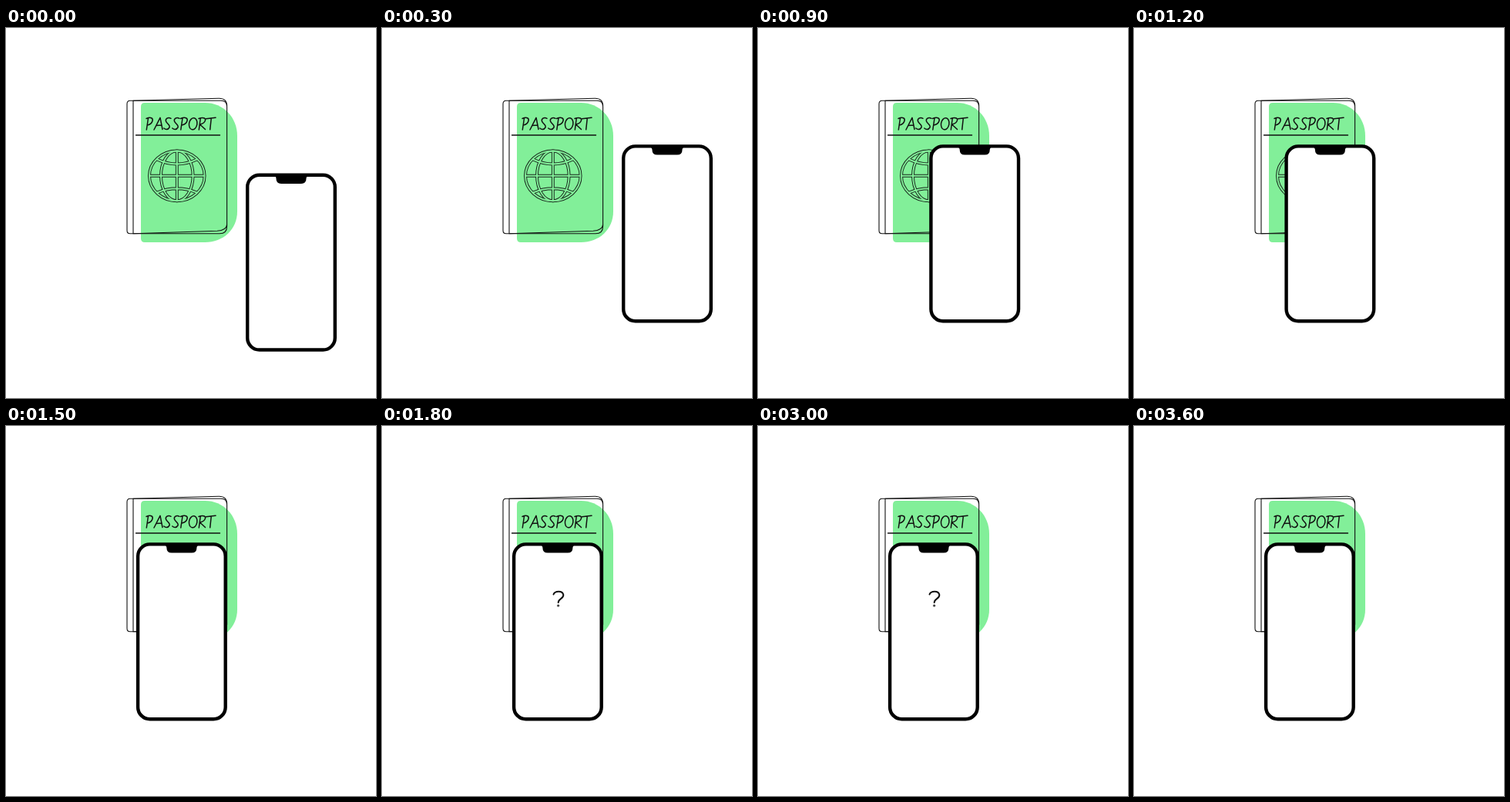
Animation, 480 px wide and 480 px high, one loop 4200 ms. Source, as an HTML page:

```html
<!DOCTYPE html>
<html lang="en">
<head>
<meta charset="utf-8">
<title>Passport and phone</title>
<style>
  html, body { margin: 0; width: 100%; height: 100%; overflow: hidden; background: #fff; }
  svg { display: block; width: 100vw; height: 100vh; }
  .line { fill: none; stroke: #111; stroke-width: 1.1; stroke-linecap: round; stroke-linejoin: round; }
</style>
</head>
<body>
<svg viewBox="0 0 480 480">
  <defs>
    <g id="globe" fill="none">
      <ellipse cx="221.8" cy="191.8" rx="35.8" ry="32.4"/>
      <ellipse cx="221.8" cy="191.8" rx="20.8" ry="32.4"/>
      <path d="M221.8 159.4V224.2M186 191.8H257.6M196 170.5Q221.8 182.5 247.6 170.5M196 213.5Q221.8 203 247.6 213.5"/>
    </g>
  </defs>

  <path fill="#82ef99" d="M180 97H258C282 97 300 116 300 140V238C300 261 282 278 258 278H180Q175 278 175 273V102Q175 97 180 97Z"/>

  <g class="line">
    <path d="M279 94.3H161Q157 94.3 157 98.5V262.5Q157 266.8 161 266.8H277Q286.6 266.8 286.6 257.5V102Q286.6 94.3 279 94.3M165 94.3V266.8"/>
    <path d="M165 94.3L276 91.2Q286.6 91 286.6 101M165 266.8L274 263.2Q286 262.5 286.6 255"/>
    <path stroke-width="1.4" d="M168.5 139H277.5"/>
  </g>

  <g class="line" style="stroke-width:1.5" role="img" aria-label="PASSPORT">
    <path d="M184.5 117L182.3 132M182 117.5C188 115 191 117 190 120.5C189 124 186 125.5 183.5 126"/>
    <path d="M192 132L200 116.3L203 131.5M195 126.6L202 126"/>
    <path id="s" d="M214 117.3C210 115 206.5 118 207.5 121C208.5 124 213.5 126 212 129C210 132.3 207 132 204.8 130"/>
    <use href="#s" x="11"/>
    <path d="M229 117L226.8 132M226.5 117.5C233 115 236 117 235 120.5C234 124 231 125.5 228 126"/>
    <ellipse cx="242.7" cy="124.3" rx="5.2" ry="7.6" transform="rotate(10 242.7 124.3)"/>
    <path d="M252.3 117L250.3 132M250 117.5C257 115 260 117.5 258 121C257 123.2 254.5 124.5 251.5 125L258.5 131.5"/>
    <path d="M259.5 117.8L272 116.3M266.3 117L264.7 131.8"/>
  </g>

  <use href="#globe" stroke="#17251b" stroke-width="3.9"/>
  <use href="#globe" stroke="#82ef99" stroke-width="2"/>

  <g id="phone">
    <rect x="2.2" y="2.2" width="113.6" height="226.8" rx="15.5" fill="#fff" stroke="#000" stroke-width="4.4"/>
    <path d="M36.5 3Q39.5 4 39.5 7Q39.5 13.4 46 13.4H72Q78.5 13.4 78.5 7Q78.5 4 81.5 3Z"/>
  </g>

  <g id="mark" class="line" style="stroke-width:2" visibility="hidden">
    <path d="M222.5 218.5C224 213.5 234.5 213 235.3 219C235.8 224 229 223.5 228.7 229"/>
    <circle cx="228.6" cy="233" r=".5"/>
  </g>
</svg>
<script>
const LOOP = 4200, STEP = 300;
const stops = [[311, 188.5], [311, 151.2], [284.3, 151.2], [222.2, 151.2], [195.4, 151.2], [168.9, 151.2]];
const phone = document.getElementById('phone');
const mark = document.getElementById('mark');

function draw(now) {
  const t = now % LOOP;
  const [x, y] = stops[Math.min(Math.floor(t / STEP), stops.length - 1)];
  phone.setAttribute('transform', `translate(${x} ${y})`);
  // the mark blinks once the phone has settled
  const lit = t >= 1800 && Math.floor((t - 1800) / 600) % 2 === 0;
  mark.setAttribute('visibility', lit ? 'visible' : 'hidden');
  requestAnimationFrame(draw);
}
draw(performance.now());
</script>
</body>
</html>
```
